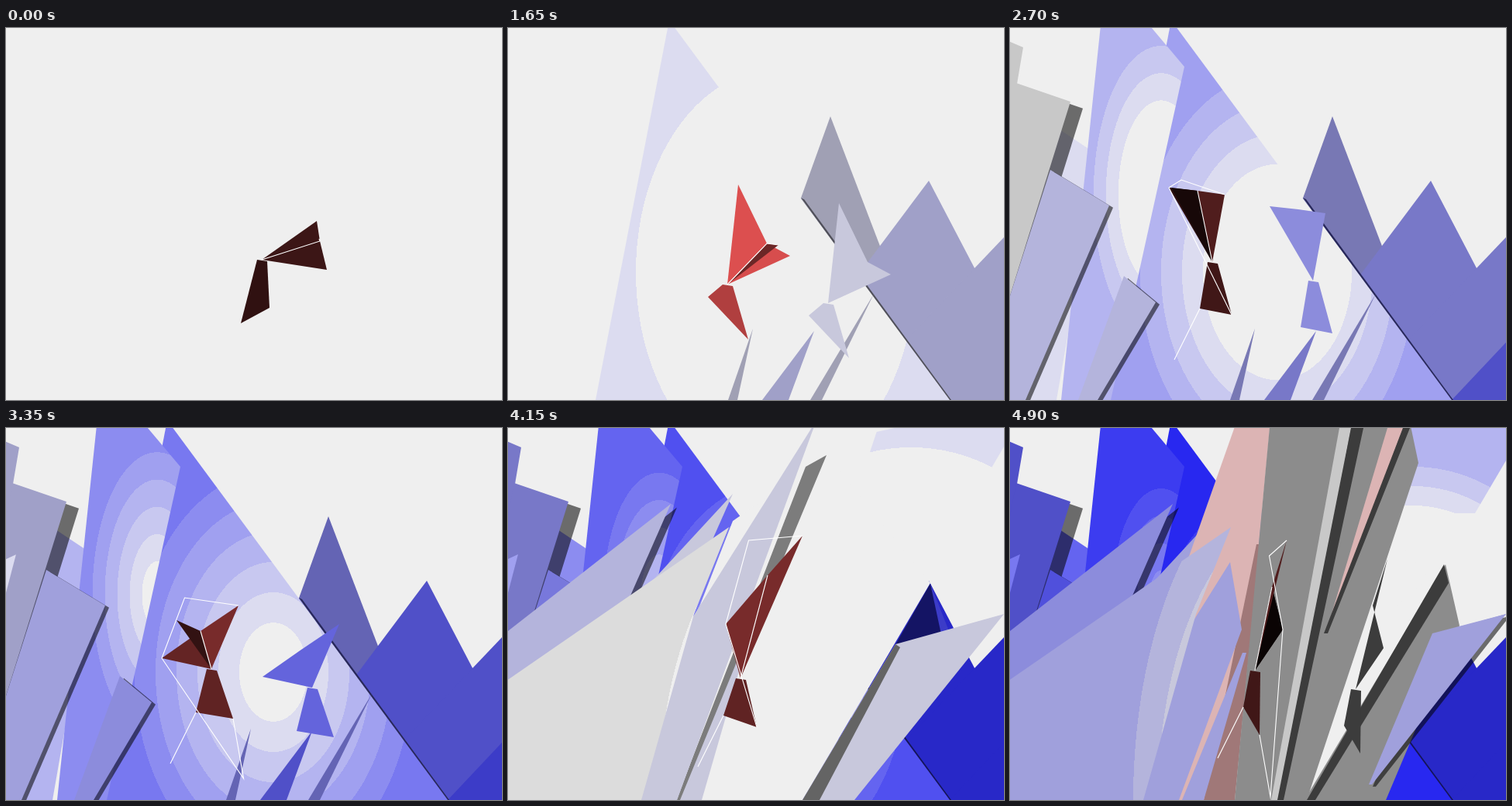
Animation, 640 px wide and 480 px high, one loop 5 s. Source, as an HTML page with a canvas:

```html
<!DOCTYPE html>
<html lang="en">
<head>
<meta charset="utf-8">
<title>Paper bird among crystals</title>
<style>
  html, body { margin: 0; width: 100%; height: 100%; overflow: hidden; background: #efefef; }
  canvas { display: block; width: 640px; height: 480px; }
</style>
</head>
<body>
<canvas id="stage" width="640" height="480"></canvas>
<script>
const LOOP = 5000, STEP = 50, FLOOR = 480, PAPER = '#efefef';
const g = document.getElementById('stage').getContext('2d');
let t = 0;

const clamp = (v, lo, hi) => Math.min(hi, Math.max(lo, v));
const progress = (start, dur) => clamp((t - start) / dur, 0, 1);
const rgb = (r, gr, b) => `rgb(${[r, gr, b].map(Math.round)})`;
const gray = v => rgb(v, v, v);

function trace(...points) {
  g.beginPath();
  points.forEach(([x, y]) => g.lineTo(x, y));
}

function fill(color, ...points) {
  trace(...points);
  g.fillStyle = color;
  g.fill();
}

function wire(...points) {
  trace(...points);
  g.strokeStyle = '#fff';
  g.lineWidth = 1.1;
  g.stroke();
}

// Paints. Crystals lose red and green with age, in coarse steps.
const aged = (base, born) =>
  Math.round(base * (1 - clamp((t - born) / 4250, 0, 0.8)) / 20) * 20;
const tint = (base, born) => () => rgb(aged(base, born), aged(base, born), base);
const flat = color => () => color;

// Rings around a highlight that shrinks while the face ages.
function lit({ x, y, aspect, ring, radius, shrink, born, blue = 240 }) {
  return () => {
    const reach = 700, inner = radius - shrink * (t - born);
    const glow = g.createRadialGradient(0, 0, 0, 0, 0, reach);
    const levels = (240 - aged(240, born)) / 20;
    for (let n = 0; n <= levels; n++) {
      const from = n ? inner + (n - 1) * ring : 0;
      const to = n < levels ? inner + n * ring : reach;
      if (to <= 0) continue;
      const color = n ? rgb(240 - n * 20, 240 - n * 20, blue) : PAPER;
      glow.addColorStop(clamp(from / reach, 0, 1), color);
      glow.addColorStop(clamp(to / reach, 0, 1), color);
    }
    g.translate(x, y);
    g.scale(1, aspect);
    return glow;
  };
}

// A shard grows from its foot (f1 to f2) up to a top edge; it may drop a shade.
function shard([x1, y1, x2, y2, f1, f2], paint, start, { shade = 0, foot = FLOOR, dur = 500 } = {}) {
  const root = (f1 + f2) / 2;
  return () => {
    if (t < start) return;
    const k = 1 - (1 - progress(start, dur)) ** 3;
    const outline = [[x1, y1], [x2, y2], [f2, foot], [f1, foot]]
      .map(([x, y]) => [root + (x - root) * k, foot + (y - foot) * k]);
    if (shade) fill('rgba(0,0,0,.55)', ...outline.map(([x, y]) => [x + shade, y + shade * 0.55]));
    trace(...outline);
    g.save();
    g.fillStyle = paint();
    g.fill();
    g.restore();
  };
}
const spike = (x, y, f1, f2, ...rest) => shard([x, y, x, y, f1, f2], ...rest);

const rose = flat(rgb(220, 180, 180)), paper = flat(PAPER);
const ridge = tint(200, 850), slate = tint(180, 1300), pale = tint(220, 3750);
const stone = flat(gray(140)), dark = flat(gray(60));

const rightRidge = [
  spike(416, 114, 284, 556, slate, 1100),
  spike(543, 197, 331, 691, ridge, 850),
  spike(700, 207, 440, 780, ridge, 700),
  spike(650, 395, 570, 730, tint(200, 250), 1900),
  shard([378, 219, 382, 221, 567, 572], tint(90, 800), 1200),
  spike(208, -10, 113, 570,
    lit({ x: 345, y: 315, aspect: 1.45, ring: 27, radius: 212, shrink: 0.08, born: 1250 }), 1150, { dur: 100 }),
  shard([470, -10, 700, -60, 430, 600],
    lit({ x: 520, y: 250, aspect: 1, ring: 25, radius: 250, shrink: 0.1, born: 3900 }), 3900, { foot: 110 }),
  spike(316, 388, 284, 296, slate, 1200),
  spike(395, 391, 328, 362, ridge, 1200),
  spike(472, 343, 390, 405, slate, 1200)
];

const leftRidge = [
  shard([40, 115, 115, 165, -40, 60], tint(240, 2400), 2000),
  shard([124, -70, 225, 50, 66, 130],
    lit({ x: 195, y: 215, aspect: 2.2, ring: 16, radius: 113, shrink: 0.055, born: 1650 }), 1800),
  shard([-20, 9, 17, 25, -150, -60], tint(200, 2550), 2150),
  shard([8, 71, 78, 95, -70, -42], tint(200, 2550), 2000, { shade: 16 }),
  shard([-20, 178, 13, 163, -90, -70], tint(240, 2900), 2900),
  shard([52, 183, 128, 229, -43, 20], tint(220, 2100), 1900, { shade: 5 }),
  shard([147, 320, 188, 354, 88, 113], tint(220, 1900), 1900, { shade: 5 })
];

const paleWave = [
  shard([290, 120, 411, 35, 150, 380], paper, 3500),
  shard([411, 35, 545, 200, 225, 380], paper, 3500),
  spike(545, 200, 500, 576, flat(rgb(60, 60, 200)), 3750, { foot: 279 }),
  spike(545, 200, 500, 562, flat(rgb(20, 20, 100)), 3750, { foot: 279 }),
  shard([384, 50, 411, 35, 217, 225], flat(gray(124)), 3600),
  spike(290, 85, -75, 115, pale, 3500),
  spike(210, 98, -279, 42, tint(220, 3380), 3400, { shade: 8 }),
  spike(398, -10, 90, 218, pale, 3500),
  shard([500, 279, 640, 240, 380, 447], pale, 3600),
  shard([500, 279, 506, 283, 380, 402], flat(gray(100)), 3600)
];

const columns = [
  spike(562, 176, 200, 385, paper, 4250),
  shard([300, -30, 338, -30, 120, 290], rose, 4250),
  shard([318, 150, 322, 150, 250, 290], flat(rgb(160, 120, 120)), 4250),
  shard([391, -600, 527, 45, 290, 383], stone, 4250),
  shard([425, 0, 440, 0, 337, 350], flat(gray(200)), 4300),
  shard([440, 0, 456, 0, 345, 353], dark, 4300),
  shard([487, 0, 507, 0, 408, 409], rose, 4350, { foot: 263 }),
  shard([507, 0, 516, 0, 405, 410], dark, 4350, { foot: 265 }),
  shard([562, 176, 580, 255, 380, 485], stone, 4300),
  shard([560, 176, 566, 200, 383, 394], dark, 4300)
];

const foreground = [
  shard([300, 290, 305, 290, 222, 250], pale, 3600),
  shard([284, 173, 299, 260, 92, 218], pale, 3500),
  shard([285, 128, 240, 240, -225, 172],
    lit({ x: 380, y: 480, aspect: 2, ring: 32, radius: 225, shrink: 0.08, born: 3650, blue: 220 }), 3500),
  shard([545, 265, 640, 240, 463, 467], pale, 4300, { foot: 460, shade: 5 })
];

// The bird: a few joints gliding between key poses.
const BEATS = [0, 750, 1650, 2700, 3350, 4150, 4900];

function glide(text) {
  const keys = text.split(' ').map(p => p.split(',').map(Number));
  return () => {
    const i = clamp(BEATS.findLastIndex(b => b <= t), 0, BEATS.length - 2);
    const u = progress(BEATS[i], BEATS[i + 1] - BEATS[i]);
    return keys[i].map((v, n) => v + (keys[i + 1][n] - v) * u);
  };
}

const joints = {
  neck: glide('330,299 299,321 283,331 261,302 265,311 300,323 316,313'),
  near: glide('401,249 371,249 297,202 277,215 300,229 380,139 357,145'),
  far: glide('414,312 412,310 364,294 205,206 201,297 281,253 352,260'),
  fold: glide('405,275 385,281 334,278 242,210 251,262 335,190 338,205'),
  crease: glide('404,272 402,300 349,280 208,206 220,248 352,190 352,260'),
  tailA: glide('340,361 329,355 310,402 286,370 293,375 321,386 322,396'),
  tailB: glide('303,381 302,332 258,347 245,362 245,367 278,371 301,360')
};
const nearRed = glide('60 100 220 80 120 120 80');
const farRed = glide('60 90 215 45 100 120 20');

const red = v => rgb(v, v * 0.36, v * 0.36);
const shift = ([x, y], dx, dy) => [x + dx, y + dy];

function pose(dx = 0, dy = 0) {
  const p = {};
  for (const name in joints) p[name] = shift(joints[name](), dx, dy);
  p.tail = [shift(p.neck, -6, 0), shift(p.neck, 7, 2), p.tailA, p.tailB];
  return p;
}

function castShadow(color) {
  const { neck, near, far, fold, tail } = pose(130, 24);
  fill(color, ...tail);
  fill(color, neck, near, fold, far);
}

function bird() {
  const { neck, near, far, fold, crease, tail, tailA, tailB } = pose();
  const [light] = nearRed(), [dim] = farRed();
  fill(red(light * 0.8), ...tail);
  fill(red(dim), neck, fold, far);
  fill(red(dim * 0.5), neck, fold, crease);
  fill(red(light), neck, near, fold);
  if (t < 2400) {
    wire(neck, fold, crease);
    return;
  }
  // loose outline that swings with the flap
  const swing = Math.sin(Math.PI * (t - 2700) / 1470) ** 2;
  const corner = [(near[0] + far[0]) / 2 - 20, Math.min(near[1], far[1]) - 10 + 30 * progress(3350, 1500)];
  wire(near, corner, far);
  wire(neck, fold);
  wire(far, shift(tailA, 14 * swing, 80 * swing), tailA);
  wire(tailB, shift(tailB, -33, 66));
}

const draw = shards => shards.forEach(s => s());

function frame(now) {
  t = Math.floor((now % LOOP) / STEP) * STEP;
  g.fillStyle = PAPER;
  g.fillRect(0, 0, 640, 480);
  draw(rightRidge);
  draw(leftRidge);
  if (t > 1200) castShadow(tint(220, 1200)());
  draw(paleWave);
  draw(columns);
  if (t > 4600) castShadow(gray(60));
  draw(foreground);
  bird();
  requestAnimationFrame(frame);
}
requestAnimationFrame(frame);
</script>
</body>
</html>
```
